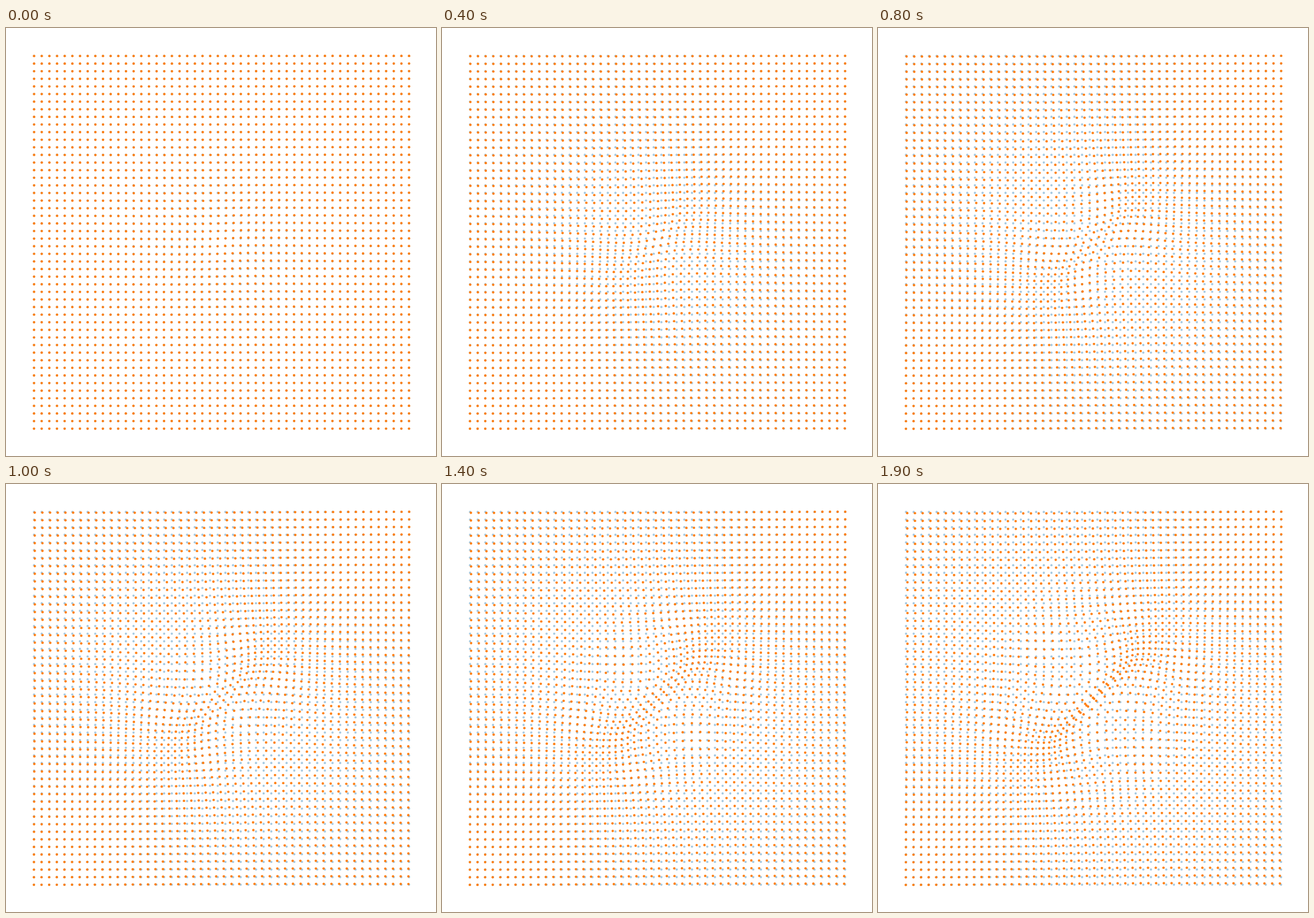
Recreate the animation shown at these times as an HTML page with a canvas. Size 727 px wide and 723 px high, loop 2 s.

```html
<!DOCTYPE html>
<html lang="en">
<head>
<meta charset="utf-8">
<title>Dot grid under growing strain</title>
<style>
html, body { margin: 0; width: 100%; height: 100%; overflow: hidden; background: #fff; }
canvas { display: block; width: 727px; height: 723px; }
</style>
</head>
<body>
<canvas id="stage" width="727" height="723"></canvas>
<script>
const ctx = document.getElementById('stage').getContext('2d');
const W = 727, H = 723;
const N = 50, STEPS = 20, STEP_MS = 100;
const LEFT = 47.4, TOP = 47.2, DX = 12.94, DY = 12.85;
const CX = LEFT + DX * (N - 1) / 2, CY = TOP + DY * (N - 1) / 2;

const STRAIN = 0.044, CORE = 91, FAR = 150;

// Displacement per step: shear along the diagonals that fades with distance;
// further out, an inward pull cancels the outward half of it.
function shift(x, y) {
  const r2 = x * x + y * y;
  const g = STRAIN / Math.pow(1 + r2 / CORE ** 2, 1.5);
  const far = r2 / (r2 + FAR ** 2);
  const shear = 1 - 0.3 * far;
  const pull = far * (0.4 - 0.4 * x * y / r2);
  return [-g * (shear * y + pull * x), -g * (shear * x + pull * y)];
}

const grid = Array.from({ length: N * N }, (_, i) => {
  const x = LEFT + DX * (i % N) - CX;
  const y = TOP + DY * Math.floor(i / N) - CY;
  const [u, v] = shift(x, y);
  return { x, y, u, v };
});

function dots(amount, radius, color) {
  ctx.fillStyle = color;
  for (const { x, y, u, v } of grid) {
    ctx.beginPath();
    ctx.arc(CX + x + u * amount, CY + y + v * amount, radius, 0, Math.PI * 2);
    ctx.fill();
  }
}

function draw(step) {
  ctx.fillStyle = '#fff';
  ctx.fillRect(0, 0, W, H);
  dots(0, 1.9, 'rgba(31,119,180,0.4)');
  dots(step, 2.1, 'rgba(255,122,8,0.95)');
}

const start = performance.now();
let shown = 0;

function tick() {
  const step = 1 + Math.floor((performance.now() - start) / STEP_MS) % STEPS;
  if (step !== shown) draw(shown = step);
  requestAnimationFrame(tick);
}
tick();
</script>
</body>
</html>
```
